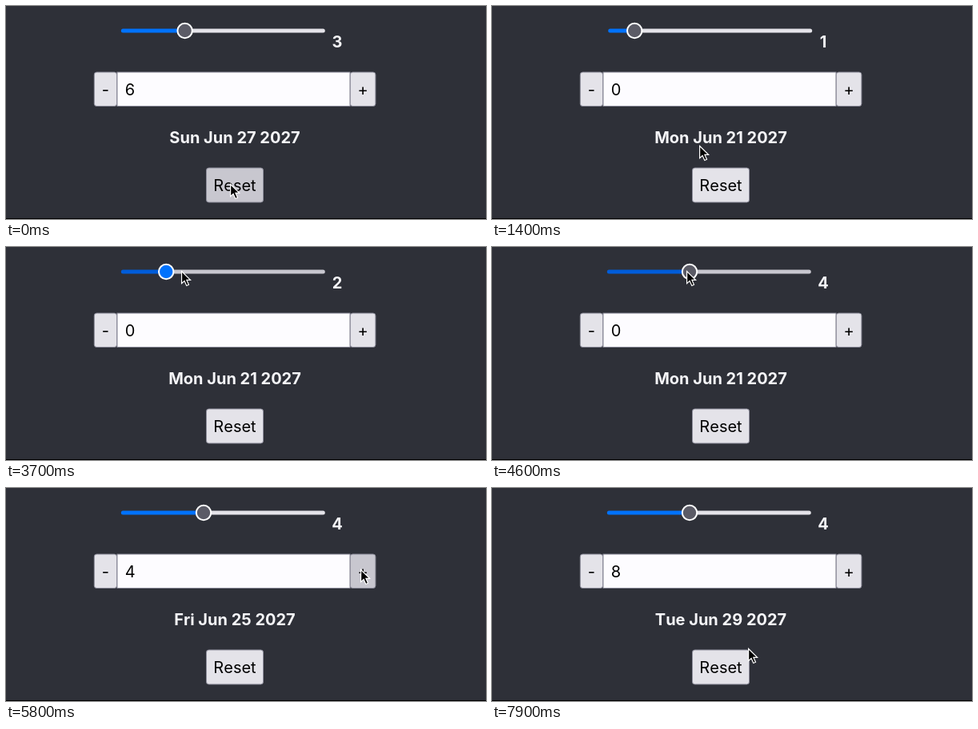
An HTML page for the animation above (8000 ms loop, 600 by 267 pixels).

```html
<!DOCTYPE html>
<html lang="en">
<meta charset="utf-8">
<title>Date stepper</title>
<style>
  html, body { margin: 0; height: 100%; overflow: hidden; background: #2e3038; }
  svg { display: block; width: 100vw; height: 100vh; }
  svg { font: 20px Inter, "Liberation Sans", sans-serif; font-kerning: none; font-feature-settings: "calt" 0; }
  .mid { text-anchor: middle; }
  .bold { font-weight: 700; fill: #f5f5f8; }
  .box { stroke: #8f8f9d; }
</style>
<svg viewBox="0 0 600 267">
  <rect width="600" height="267" fill="#2e3038"/>
  <rect y="266" width="600" height="1" fill="#000"/>
  <g id="slider">
    <path id="track" stroke-width="5" stroke-linecap="round"/>
    <path id="fill" stroke-width="5" stroke-linecap="round"/>
    <circle id="thumb" cy="31" r="9.2" stroke="#fff" stroke-width="2"/>
  </g>
  <text id="step" class="mid bold" x="414" y="52"></text>
  <rect class="box" x="139" y="83" width="291" height="42.5" fill="#fdfcff"/>
  <rect class="box" x="110.3" y="83" width="28.2" height="42.5" rx="3" fill="#e4e3e9"/>
  <rect id="plus" class="box" x="430.3" y="83" width="31.6" height="42.5" rx="3"/>
  <rect id="reset" class="box" x="250.5" y="203" width="71" height="43" rx="3"/>
  <text class="mid" x="124.3" y="112">-</text>
  <text class="mid" x="446" y="112">+</text>
  <text id="count" x="148.7" y="112"></text>
  <text id="date" class="mid bold" x="286" y="172"></text>
  <text class="mid" x="286" y="232">Reset</text>
  <path id="cursor" d="M0 0V15.2L3.5 12 6.2 18 8.9 16.8 6.3 10.9H11Z" stroke="#fff" stroke-width="1.2"/>
</svg>
<script>
const $ = id => document.getElementById(id);
const set = (id, attrs) => { for (const k in attrs) $(id).setAttribute(k, attrs[k]); };
const LOOP = 8000, TICK = 100, UNIT = 23.4;

// pointer moves: start, end, x, y
const moves = [
  [900, 1400, 260, 176],
  [1400, 1700, 200, -2],
  [1700, 2200, 183, 31],
  [2800, 3300, 197, 31],
  [3600, 4100, 244, 31],
  [4800, 5100, 432, 138],
  [5100, 5400, 444, 103],
  [7700, 7900, 321, 202]
];
const clicks = [5700, 6400];

const easeOut = k => 1 - (1 - k) ** 3;

function pointer(t) {
  let x = 281, y = 224;
  for (const [from, to, mx, my] of moves) {
    const k = easeOut(Math.min(1, Math.max(0, (t - from) / (to - from))));
    x += (mx - x) * k;
    y += (my - y) * k;
  }
  return [x, y];
}

// the value follows the dragged pointer one tick late
function stepAt(t) {
  if (t < 900) return 3;
  if (t < 2800) return 1;
  return Math.round((pointer(Math.min(t, 4600) - TICK)[0] - 154) / UNIT);
}

const countAt = t => t < 900 ? 6 : 4 * clicks.filter(c => t > c).length;
const shade = (hover, down) => down ? "#b0aeb8" : hover ? "#c8c7cf" : "#e4e3e9";

function draw(t) {
  const [x, y] = pointer(t);
  const over = (l, top, r, b) => x > l && x < r && y > top && y < b;
  const step = stepAt(t), count = countAt(t);

  const thumb = 9.6 + UNIT * step;
  const hot = over(144, 20, 400, 42);
  set("slider", { transform: `translate(${step === 1 ? 145.2 : 143.8})` });
  set("track", { d: `M${thumb} 31H252.5`, stroke: shade(hot) });
  set("fill", { d: `M2.5 31H${thumb}`, stroke: hot ? "#005cd9" : "#0072fc" });
  set("thumb", { cx: thumb, fill: t >= 2500 && t < 4600 ? "#0072fc" : "#5b5b66" });

  set("plus", { fill: shade(over(430, 83, 462, 126), clicks.includes(t)) });
  set("reset", { fill: shade(over(250, 203, 321, 246), t >= 400 && t < 900) });
  set("cursor", { transform: `translate(${x - 0.4} ${y - 0.5})` });

  $("step").textContent = step;
  $("count").textContent = count;
  $("date").textContent = new Date(2027, 5, 21 + count).toDateString();
}

const start = performance.now();
function frame() {
  const t = (performance.now() - start) % LOOP;
  draw(Math.floor(t / TICK) * TICK);
  requestAnimationFrame(frame);
}
frame();
</script>
</html>
```
